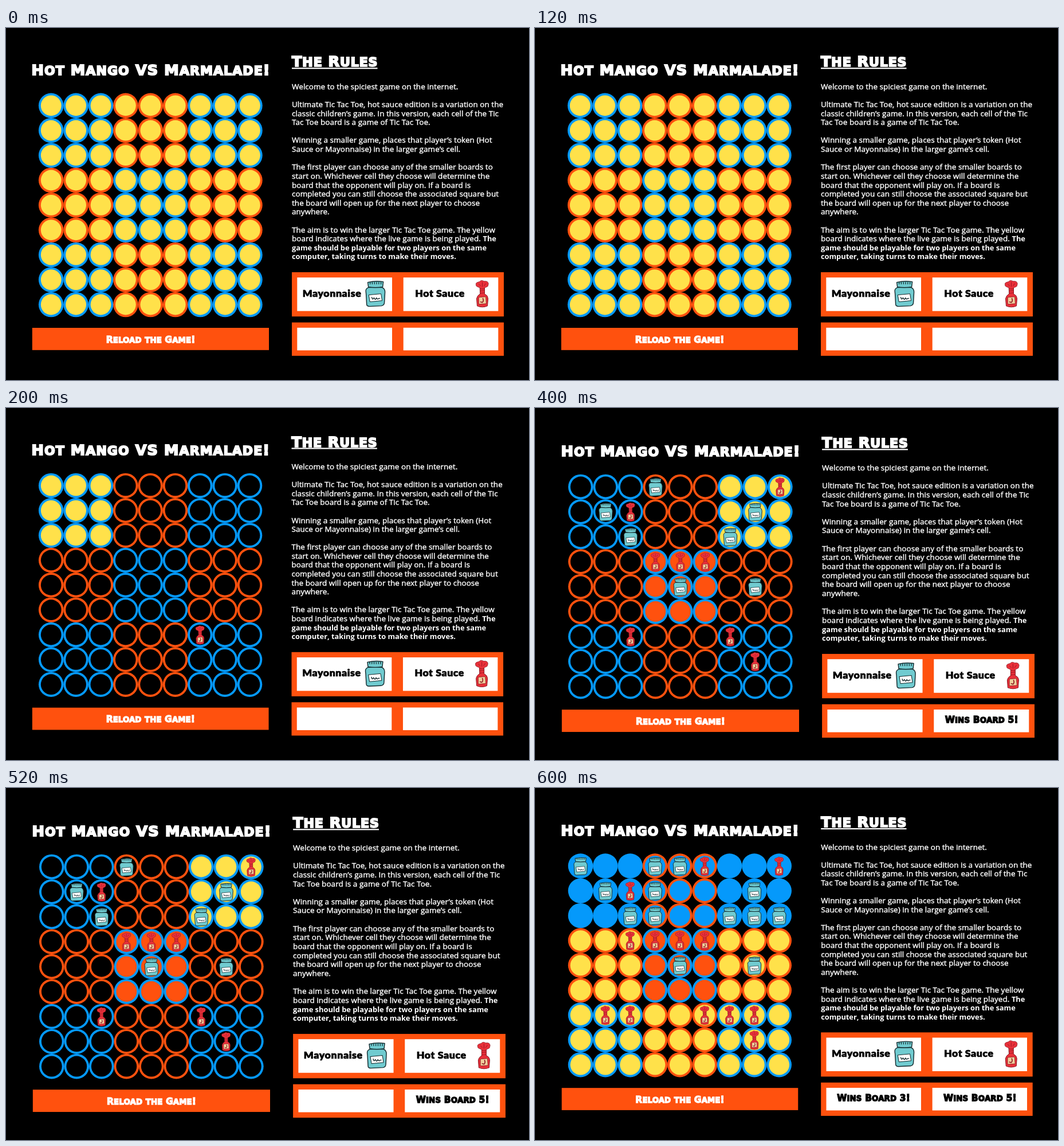
An HTML page with a canvas that plays this animation: 913 by 614 pixels, repeating every 800 ms.

```html
<!DOCTYPE html>
<html lang="en">
<head>
<meta charset="utf-8">
<title>Ultimate Tic Tac Toe</title>
<style>
  html, body { margin: 0; width: 100%; height: 100%; overflow: hidden; background: #000; }
  canvas, svg { position: absolute; left: 0; top: 0; width: 913px; height: 614px; }
  .rules { font: 400 13.5px "Open Sans", sans-serif; letter-spacing: .04px; fill: #fff; stroke: #fff; stroke-width: .42; }
  .rules .bold { font-weight: 700; font-size: 12.9px; letter-spacing: -.05px; stroke: none; }
  .head { font-family: "DejaVu Sans", sans-serif; font-weight: 700; stroke-linejoin: miter; }
  .label { font: 900 17.7px Lato, sans-serif; letter-spacing: .6px; fill: #000; stroke: #000; stroke-width: .7; text-anchor: middle; }
</style>
</head>
<body>
<canvas id="board"></canvas>
<svg viewBox="0 0 913 614"><g id="words"></g></svg>
<script>
const W = 913, H = 614, STEP = 200;
const BLUE = '#0599fb', ORANGE = '#ff510e', YELLOW = '#ffe14a', WHITE = '#fff', BLACK = '#000';
const FILLS = { y: YELLOW, b: BLUE, o: ORANGE };

// boards: fill of each of the nine boards; jars and sauces: row and column of each token
const STATES = [
  { boards: 'yyyyyyyyy', jars: '', sauces: '', wins: [0, 0], view: [1, 0, 0] },
  { boards: 'y........', jars: '', sauces: '66', wins: [0, 0], view: [.9988, .1, .3] },
  { boards: '..y.o....', jars: '03 11 17 22 26 44 47', sauces: '08 12 33 34 35 62 66 77',
    wins: [0, 1], view: [1.0024, .9, 1.9] },
  { boards: 'bbbyoyyyy', jars: '00 03 04 11 13 17 22 23 26 27 28 44 47',
    sauces: '05 08 12 32 33 34 35 61 62 65 66 67 77', wins: [1, 1], view: [.9986, .9, .9] }
];

const RULES = [
  'Welcome to the spiciest game on the internet.', '',
  'Ultimate Tic Tac Toe, hot sauce edition is a variation on the',
  'classic children’s game. In this version, each cell of the Tic',
  'Tac Toe board is a game of Tic Tac Toe.', '',
  'Winning a smaller game, places that player’s token (Hot',
  'Sauce or Mayonnaise) in the larger game’s cell.', '',
  'The first player can choose any of the smaller boards to',
  'start on. Whichever cell they choose will determine the',
  'board that the opponent will play on. If a board is',
  'completed you can still choose the associated square but',
  'the board will open up for the next player to choose',
  'anywhere.', '',
  'The aim is to win the larger Tic Tac Toe game. The yellow',
  'board indicates where the live game is being played. *The',
  '*game should be playable for two players on the same',
  '*computer, taking turns to make their moves.'
];

const words = document.getElementById('words');

function add(parent, tag, attrs, text = '') {
  const el = document.createElementNS('http://www.w3.org/2000/svg', tag);
  for (const k in attrs) el.setAttribute(k, attrs[k]);
  el.textContent = text;
  parent.append(el);
  return el;
}

// Heading in small capitals
function heading(text, x, y, size, gap, weight, color, anchor = 'middle') {
  const el = add(words, 'text', {
    class: 'head', x, y, fill: color, stroke: color,
    'stroke-width': weight, 'letter-spacing': gap, 'text-anchor': anchor
  });
  for (const run of text.match(/[a-z]+|[^a-z]+/g)) {
    const small = /[a-z]/.test(run);
    add(el, 'tspan', { 'font-size': small ? size * .86 : size }, run.toUpperCase());
  }
  return el;
}

heading('Hot Mango VS Marmalade!', 253, 82.2, 25.5, 1.15, 2.1, WHITE);
heading('The Rules', 499, 67.3, 25.5, .95, 2.1, WHITE, 'start');
heading('Reload the Game!', 252.5, 548.6, 15.5, .1, 1.3, WHITE);
const wins = [
  heading('Wins Board 3!', 591, 545.6, 15.5, .15, 1.3, BLACK),
  heading('Wins Board 5!', 777, 545.6, 15.5, .15, 1.3, BLACK)
];
add(words, 'text', { class: 'label', x: 569, y: 468.7 }, 'Mayonnaise');
add(words, 'text', { class: 'label', x: 757.5, y: 468.7 }, 'Hot Sauce');

RULES.forEach((line, i) => {
  const [plain, bold] = line.split('*');
  const el = add(words, 'text', { class: 'rules', x: 499, y: 106.8 + i * 15.61 }, plain);
  if (bold) add(el, 'tspan', { class: 'bold' }, bold);
});

const canvas = document.getElementById('board');
const dpr = window.devicePixelRatio || 1;
canvas.width = W * dpr;
canvas.height = H * dpr;
const c = canvas.getContext('2d');

function box(color, x1, y1, x2, y2) {
  c.fillStyle = color;
  c.fillRect(x1, y1, x2 - x1, y2 - y1);
}

function disc(x, y, r, color) {
  c.beginPath();
  c.arc(x, y, r, 0, Math.PI * 2);
  c.fillStyle = color;
  c.fill();
}

function shape(d, fill, line, width) {
  const p = new Path2D(d);
  if (fill) { c.fillStyle = fill; c.fill(p); }
  if (line) { c.strokeStyle = line; c.lineWidth = width; c.stroke(p); }
}

function place(draw, x, y, scale) {
  c.save();
  c.translate(x, y);
  c.scale(scale, scale);
  c.lineJoin = c.lineCap = 'round';
  draw();
  c.restore();
}

function jar() {
  const teal = '#70cbd0', ink = '#12282c';
  shape('M-12-11C-17-9-17-6-16 0L-15 18Q-15 22-10 22L11 21Q16 20 16 15L17-3Q17-9 12-11Z', teal, ink, 1.4);
  shape('M-13-20Q0-23 14-21L13-12Q0-10-12-12Z', teal, ink, 1.4);
  for (let x = -9; x <= 10; x += 3.8) shape(`M${x}-20L${x}-17`, null, ink, 1.2);
  shape('M-11 2L10 0L12 12L-9 14Z', WHITE, ink, 1);
  shape('M-6 6Q-5 11-3 8Q-2 6-1 9Q1 11 2 7Q4 11 6 8L8 8', null, ink, 1.4);
}

function sauce() {
  const red = '#e9303a', dark = '#8a1820';
  shape('M-4-12L4-12L4 0Q10 3 10 8L9 21Q0 25-9 21L-10 8Q-9 3-4 0Z', red, dark, 1);
  shape('M-3-9C-5-13-11-11-11-16C-12-21-6-20-4-22C-1-25 2-22 4-22C9-23 12-19 10-15C10-11 5-13 3-9Z', red, dark, .8);
  shape('M-6-17L-3-14M0-20L0-13M6-18L3-14M-4-5L4-6M-4-1L4-2', null, dark, .8);
  shape('M-6 6L6 5L7 17L-6 18Z', '#efcf9d', dark, .8);
  shape('M1 8Q3 12 0 15L-3 14', null, dark, 1.6);
}

const PITCH = 43.4;
const cellX = col => 78.7 + col * PITCH;
const cellY = row => 135.3 + row * PITCH;

function tokens(list, draw) {
  for (const [row, col] of list.split(' ').filter(Boolean))
    place(draw, cellX(+col), cellY(+row) + .6, .7);
}

function grid(boards) {
  for (let row = 0; row < 9; row++) for (let col = 0; col < 9; col++) {
    const b = Math.floor(row / 3) * 3 + Math.floor(col / 3);
    const x = cellX(col), y = cellY(row);
    disc(x, y, 21.8, b % 2 ? ORANGE : BLUE);
    disc(x, y, 17.9, FILLS[boards[b]] || BLACK);
  }
}

function panel(top, bottom) {
  box(ORANGE, 499, top, 869, bottom);
  box(WHITE, 508.3, top + 9.2, 674, bottom - 9.5);
  box(WHITE, 693.7, top + 9.2, 859.3, bottom - 9.5);
}

function render(state) {
  const [s, dx, dy] = state.view;
  c.setTransform(dpr, 0, 0, dpr, 0, 0);
  box(BLACK, 0, 0, W, H);
  c.translate(dx, dy);
  c.scale(s, s);

  box(WHITE, 499, 69.2, 648.5, 71.4);
  grid(state.boards);
  tokens(state.jars, jar);
  tokens(state.sauces, sauce);
  box(ORANGE, 45.8, 523, 459, 561.8);
  panel(426, 503.2);
  panel(513.6, 571.8);
  place(jar, 644.6, 463.6, 1);
  place(sauce, 831.5, 463.8, 1);

  words.setAttribute('transform', `translate(${dx} ${dy}) scale(${s})`);
  wins.forEach((el, i) => el.setAttribute('visibility', state.wins[i] ? 'visible' : 'hidden'));
}

let start = null, shown = -1;
function tick(now) {
  if (start === null) start = now;
  const i = Math.floor((now - start) / STEP) % STATES.length;
  if (i !== shown) render(STATES[shown = i]);
  requestAnimationFrame(tick);
}
render(STATES[0]);
requestAnimationFrame(tick);
</script>
</body>
</html>
```
